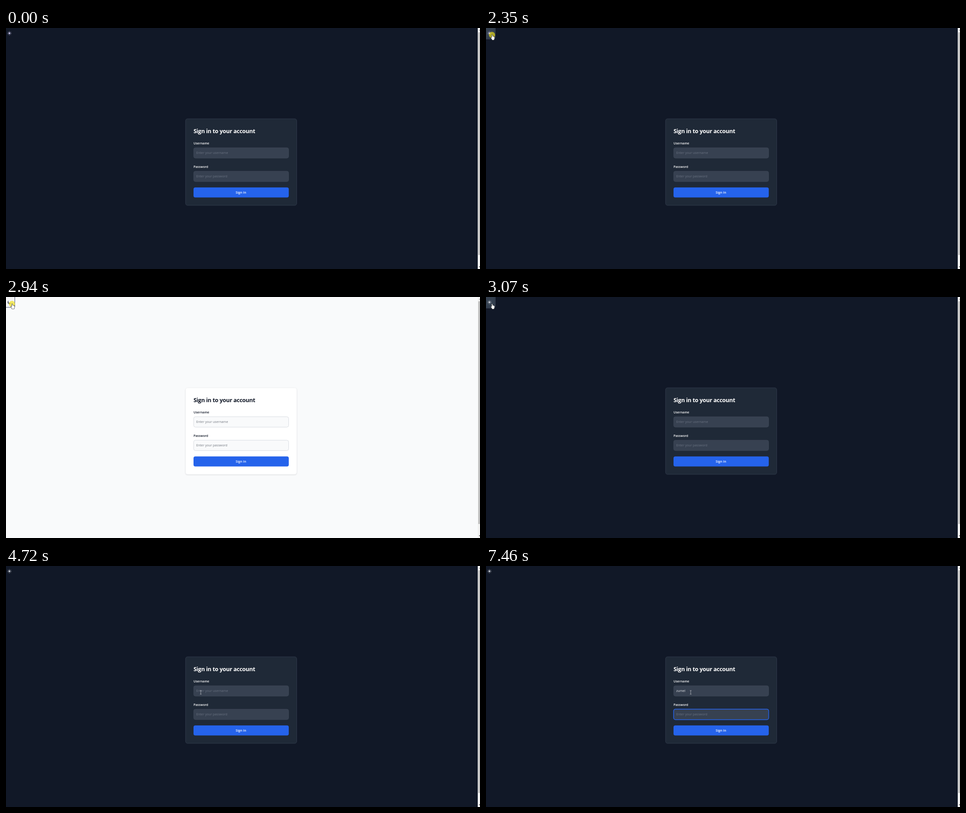
An HTML page with a canvas that plays this animation: 1049 by 534 pixels, repeating every 7.99 s.

```html
<!DOCTYPE html>
<html lang="en">
<head>
<meta charset="utf-8">
<title>Sign in</title>
<style>
  html, body { margin: 0; width: 100%; height: 100%; overflow: hidden; background: #111827; }
  canvas { display: block; }
</style>
</head>
<body>
<canvas id="stage" width="1049" height="534"></canvas>
<script>
const ctx = document.getElementById('stage').getContext('2d');
const LOOP = 7990, TICK = 70;
const FONT = '"Open Sans", "Noto Sans", sans-serif';
const USER = 'zumel';
const SUGGESTIONS = ['zumel', 'zumelavinkij'];
const KEY_TIMES = [5730, 6060, 6260, 6360, 6460];
const BLUE = '#2563eb';

const DARK = {
  page: '#111827', card: '#1f2937', cardLine: '#374151', title: '#ffffff', label: '#ffffff',
  input: '#374151', inputLine: '#3f4958', hint: '#697281', text: '#e5e7eb'
};
const LIGHT = {
  page: '#f9fafb', card: '#ffffff', cardLine: '#f1f2f4', title: '#111827', label: '#111827',
  input: '#f9fafb', inputLine: '#d1d5db', hint: '#737880', text: '#111827'
};

const ease = {
  linear: p => p,
  start: p => p ** 1.2,
  out: p => 1 - (1 - p) ** 2,
  inOut: p => p * p * (3 - 2 * p)
};
// Pointer stops: time, x, y, easing towards the next stop
const POINTER = [
  [170, 850, 545, ease.out],
  [430, 376, 441, ease.linear],
  [820, 376, 441, ease.inOut],
  [1660, 56, 43, ease.out],
  [2080, 13.5, 15, ease.linear],
  [3330, 13.5, 15, ease.start],
  [4160, 257, 208, ease.linear],
  [4720, 431, 280, ease.out],
  [5000, 453, 280, ease.linear]
];

const between = (t, a, b) => t >= a && t < b;

function pointerAt(t) {
  if (t < 240) return null;
  const i = POINTER.findLastIndex(stop => t >= stop[0]);
  const [t0, x0, y0, curve] = POINTER[i];
  const next = POINTER[i + 1];
  if (!next) return { x: x0, y: y0 };
  const elapsed = Math.floor((t - t0) / TICK) * TICK;
  const p = curve(elapsed / (next[0] - t0));
  return { x: x0 + (next[1] - x0) * p, y: y0 + (next[2] - y0) * p };
}

function box(x, y, w, h, r, fill, line, width = 1) {
  ctx.beginPath();
  ctx.roundRect(x, y, w, h, r);
  if (fill) { ctx.fillStyle = fill; ctx.fill(); }
  if (line) { ctx.strokeStyle = line; ctx.lineWidth = width; ctx.stroke(); }
}

function write(str, x, y, size, weight, color, align = 'left', spacing = 0) {
  ctx.font = `${weight} ${size}px ${FONT}`;
  ctx.letterSpacing = spacing + 'px';
  ctx.textAlign = align;
  ctx.fillStyle = color;
  ctx.fillText(str, x, y);
}

function polygon(points, fill, line, width) {
  ctx.beginPath();
  points.forEach(([x, y]) => ctx.lineTo(x, y));
  ctx.closePath();
  ctx.lineJoin = 'round';
  if (line) { ctx.strokeStyle = line; ctx.lineWidth = width; ctx.stroke(); }
  ctx.fillStyle = fill;
  ctx.fill();
}

function scrollbar() {
  ctx.fillStyle = '#f1f1f1';
  ctx.fillRect(1044, 0, 5, 534);
  ctx.fillStyle = '#c1c1c1';
  ctx.fillRect(1045, 9.5, 4, 493.5);
  polygon([[1046.3, 6], [1048.7, 3.5], [1051, 6]], '#a3a3a3');
  polygon([[1046.3, 528], [1048.7, 530.5], [1051, 528]], '#505050');
}

function sun(color) {
  ctx.fillStyle = ctx.strokeStyle = color;
  ctx.beginPath();
  ctx.arc(7.6, 11.6, 2.1, 0, 2 * Math.PI);
  ctx.fill();
  ctx.lineWidth = 1;
  ctx.beginPath();
  for (let i = 0; i < 8; i++) {
    const a = i * Math.PI / 4, c = Math.cos(a), s = Math.sin(a);
    ctx.moveTo(7.6 + c * 3.1, 11.6 + s * 3.1);
    ctx.lineTo(7.6 + c * 4.4, 11.6 + s * 4.4);
  }
  ctx.stroke();
}

function moon() {
  ctx.save();
  ctx.translate(2.2, 6.2);
  ctx.scale(.53, .53);
  ctx.fillStyle = '#6b7280';
  ctx.fill(new Path2D('M17.3 13.3A8 8 0 0 1 6.7 2.7a8 8 0 1 0 10.6 10.6z'));
  ctx.restore();
}

function themeButton(t, light, hover) {
  const focused = t >= 2350;
  if (hover && light) {
    box(-6, -6, 25.5, 29, 3, '#f3f4f6', '#4b5575');
  } else if (hover) {
    if (focused) box(-6, -6, 26.6, 30.6, 4, '#374151', '#414b5b', .8);
    box(-6, -6, 24.8, 28.8, 3, '#344050', focused ? '#293443' : null, .8);
  }
  if (light) moon();
  else sun(t < 2410 ? '#c3c0e4' : '#c5c9d1');
}

function field(y, label, value, hint, focused, caret, theme) {
  write(label, 415, y - 7.2, 7, 600, theme.label);
  box(415.3, y + .3, 210.2, 23, 4, theme.input, theme.inputLine, .8);
  if (focused) box(415.3, y + .2, 210.3, 23.2, 4, null, BLUE, 1.5);
  write(value || hint, 421, y + 14.3, 7.15, 400, value ? theme.text : theme.hint);
  if (caret) {
    const x = 421 + (value ? Math.round(ctx.measureText(value).width) : 0);
    ctx.fillStyle = theme.text;
    ctx.fillRect(x, y + 6, .8, 11);
  }
}

function form(t, theme, light) {
  const typed = USER.slice(0, KEY_TIMES.filter(k => t >= k).length);
  const userFocus = between(t, 5000, 6920);

  ctx.save();
  if (light) {
    ctx.shadowColor = 'rgba(0,0,0,.14)';
    ctx.shadowBlur = 3;
    ctx.shadowOffsetY = 1;
  }
  box(397.4, 201.2, 246, 191.8, 4.5, theme.card);
  ctx.restore();
  box(397.4, 201.2, 246, 191.8, 4.5, null, theme.cardLine, .8);

  write('Sign in to your account', 415, 233, 12.55, 700, theme.title, 'left', -.31);
  field(265, 'Username', typed, 'Enter your username', userFocus,
    userFocus && !between(t, 5530, 5730), theme);
  field(317, 'Password', '', 'Enter your password', t >= 6920, between(t, 6920, 7460), theme);
  box(415, 353.2, 210.8, 22.4, 4, BLUE);
  write('Sign In', 520, 366.9, 7.25, 600, '#ffffff', 'center');
}

function suggestions(t) {
  if (!between(t, 5730, 7130)) return;
  const fade = t < 6920 ? 0 : Math.floor((t - 6920) / TICK) + 1;
  ctx.globalAlpha = 1 - fade / 4;
  box(469, 291.5, 59.5, 46.5, 1, '#2b2b2b');
  SUGGESTIONS.forEach((name, i) => write(name, 476, 308 + i * 19.7, 6.7, 400, '#ececec'));
  ctx.globalAlpha = 1;
}

function arrow() {
  polygon([[.5, .5], [.5, 8.2], [2.2, 6.7], [3.3, 9.1], [4.3, 8.7], [3.3, 6.3], [5.7, 6.2]],
    '#ffffff', '#000000', 1);
}

function hand() {
  polygon([[-.8, .8], [0, .1], [.9, .8], [1, 3.5], [4.2, 4.3], [5.3, 5.2], [5.2, 8.3], [4.2, 11.4],
    [-.2, 11.4], [-.7, 9.7], [-2.6, 6.8], [-2.4, 5.8], [-.8, 6.8]], '#ffffff', '#000000', 1.1);
}

function beam() {
  ctx.strokeStyle = '#b9bcc2';
  ctx.lineWidth = .8;
  ctx.beginPath();
  ctx.moveTo(0, -4);
  ctx.lineTo(0, 4);
  for (const y of [-4, 4]) {
    ctx.moveTo(-1.8, y);
    ctx.lineTo(1.8, y);
  }
  ctx.stroke();
}

function pointer(t, pos, overButton) {
  const overField = between(pos.x, 415, 626) && between(pos.y, 265, 289);
  const pressed = between(t, 2350, 2410) || between(t, 2940, 3070) || between(t, 4930, 5000);
  ctx.save();
  ctx.translate(pos.x, pos.y);
  if (pressed) {
    ctx.fillStyle = 'rgba(240,225,20,.65)';
    ctx.beginPath();
    ctx.arc(-.2, .4, 6.8, 0, 2 * Math.PI);
    ctx.fill();
  }
  (overButton ? hand : overField ? beam : arrow)();
  ctx.restore();
}

function draw(t) {
  const light = between(t, 2410, 3070);
  const theme = light ? LIGHT : DARK;
  const pos = pointerAt(t);
  const hover = !!pos && pos.x < 19 && pos.y < 23;
  ctx.fillStyle = theme.page;
  ctx.fillRect(0, 0, 1049, 534);
  scrollbar();
  themeButton(t, light, hover);
  form(t, theme, light);
  suggestions(t);
  if (pos) pointer(t, pos, hover);
}

const begin = performance.now();
function frame() {
  draw((performance.now() - begin) % LOOP);
  requestAnimationFrame(frame);
}
frame();
</script>
</body>
</html>
```
